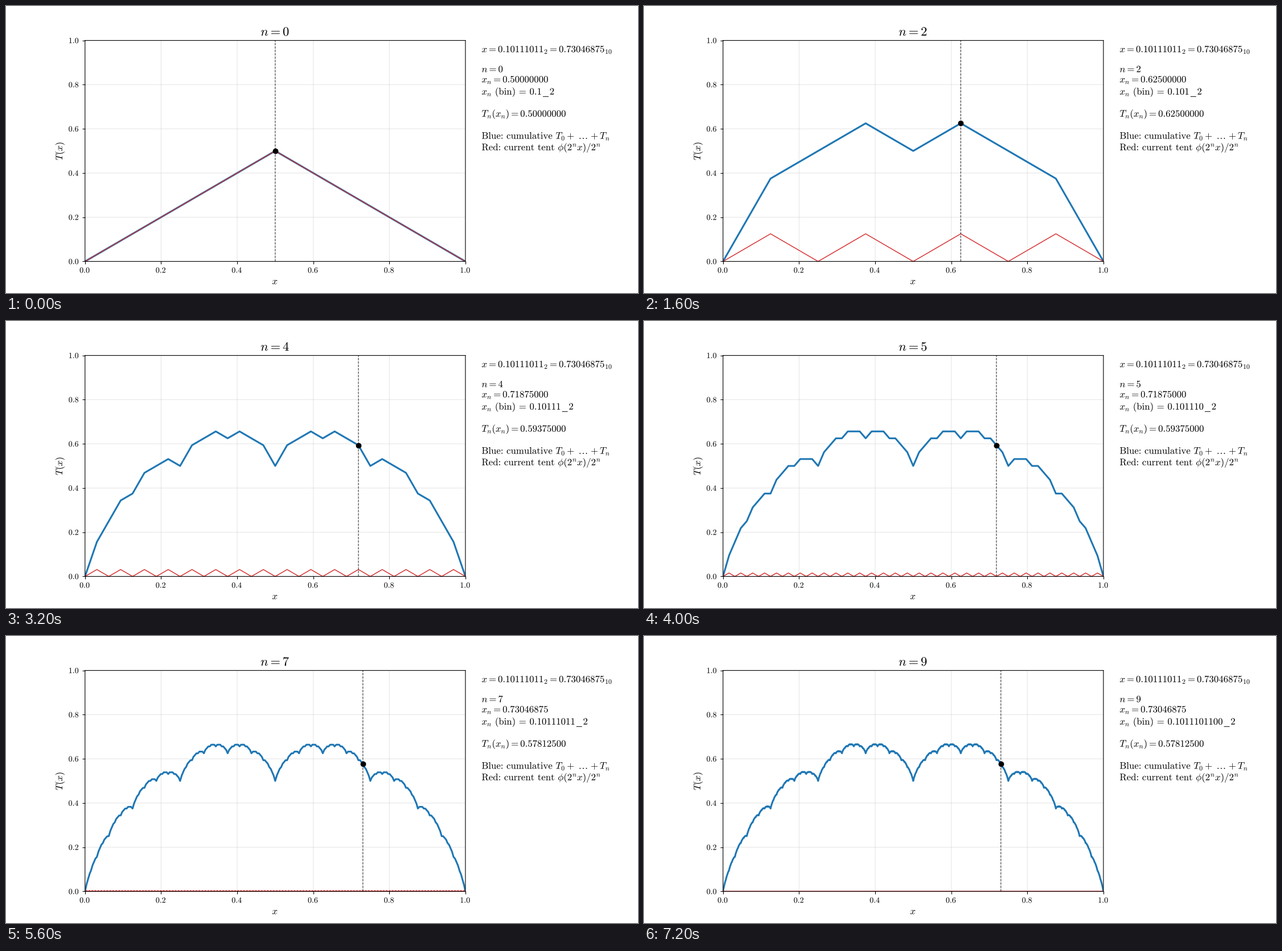
Animation, 1110 px wide and 505 px high, one loop 8 s. Source, as a matplotlib script:

```python
import matplotlib.pyplot as plt
import numpy as np
from matplotlib.animation import FuncAnimation
from matplotlib.lines import Line2D
from matplotlib.patheffects import Normal

WIDTH, HEIGHT = 1110, 505
DPI = WIDTH / 11
STEPS = 10
X = 0b10111011 / 2**8
INFO_X = 835.4
DIGIT = 8.39  # advance of one digit in the info column

# Soft sub-pixel placement of lines and text instead of snapping to pixels.
plt.rcParams["path.snap"] = False
plt.rcParams["mathtext.fontset"] = "cm"

fig, (ax, info) = plt.subplots(
    1, 2, figsize=(WIDTH / DPI, HEIGHT / DPI), dpi=DPI, facecolor="white",
    gridspec_kw={"width_ratios": [4, 1], "wspace": 0.06})
info.axis("off")
box = ax.get_position()
LEFT, RIGHT = box.x0 * WIDTH, box.x1 * WIDTH
TOP, BOTTOM = (1 - box.y1) * HEIGHT, (1 - box.y0) * HEIGHT


def put(x, y, text, size=12, **kw):
    """Place text as outlines with its baseline at stage pixel (x, y)."""
    kw.setdefault("va", "baseline")
    return fig.text(x / WIDTH, 1 - y / HEIGHT, text, fontsize=size,
                    path_effects=[Normal()], **kw)


def roman(*words):
    """Upright words joined by text spaces, for use in math mode."""
    return r"\hspace{0.38}".join(rf"\mathrm{{{w}}}" for w in words)


def tent(x, n):
    y = x * 2**n
    return np.abs(y - np.round(y)) / 2**n


def partial_sum(x, n):
    return sum(tent(x, k) for k in range(n + 1))


ticks = np.linspace(0, 1, 6)
ax.set(xlim=(0, 1), ylim=(0, 1))
ax.set_xticks(ticks, [""] * 6)
ax.set_yticks(ticks, [""] * 6)
ax.grid(True, alpha=0.3)
for t in ticks:
    label = f"${t:.1f}$"
    put(LEFT + t * (RIGHT - LEFT), 469.3, label, 10, ha="center")
    put(129, BOTTOM - t * (BOTTOM - TOP) + 4.7, label, 10, ha="right")

middle = (LEFT + RIGHT) / 2
put(middle, 489.5, "$x$", ha="center")
put(94.5, 255, "$T(x)$", ha="center", va="center", rotation=90)
title = put(middle, 52.2, "", 16, ha="center")

COLON = r"\hspace{-0.2}:\hspace{0.18}"
put(INFO_X, 81.3, "$x=0.10111011_2=0.73046875_{10}$")
n_text = put(INFO_X, 116.4, "")
x_text = put(INFO_X, 134.4, "")
bin_text = put(INFO_X, 155.8, "")
base_text = put(INFO_X, 155.8, "$2$")
value_text = put(INFO_X, 194.7, "")
put(INFO_X, 233.7, "$" + roman("Blue") + COLON + roman("cumulative")
    + r"\hspace{0.38}T_0+$")
put(1012.5, 233.7, r"$\dots$", ha="center")
put(1024, 233.7, r"$\hspace{0}+T_n$")
put(INFO_X, 253.8, "$" + roman("Red") + COLON + roman("current", "tent")
    + r"\hspace{0.38}\phi(2^n x)/2^n$")
underscore = Line2D([], [], color="black", lw=0.7, solid_capstyle="butt")
fig.add_artist(underscore)

grid = np.linspace(0, 1, 2049)
total_line, = ax.plot([], [], color="tab:blue", lw=2.2)
tent_line, = ax.plot([], [], color="tab:red", lw=1)
guide = ax.axvline(0.5, color="black", ls="--", lw=0.8, alpha=0.8)
point, = ax.plot([], [], "ko", ms=6)


def update(n):
    prefix = int(X * 2**(n + 1))
    xn = prefix / 2**(n + 1)
    value = partial_sum(xn, n)
    total_line.set_data(grid, partial_sum(grid, n))
    tent_line.set_data(grid, tent(grid, n))
    guide.set_xdata([xn, xn])
    point.set_data([xn], [value])

    title.set_text(f"$n={n}$")
    n_text.set_text(f"$n={n}$")
    x_text.set_text(f"$x_n={xn:.8f}$")
    bin_text.set_text(r"$x_n\hspace{0.38}\mathrm{(bin)}\hspace{0.18}=\hspace{0.18}"
                      f"0.{prefix:0{n + 1}b}$")
    value_text.set_text(f"$T_n(x_n)={value:.8f}$")
    shift = n * DIGIT
    underscore.set_data([(943 + shift) / WIDTH, (953 + shift) / WIDTH],
                        [1 - 159.3 / HEIGHT] * 2)
    base_text.set_x((954.7 + shift) / WIDTH)
    return ()


animation = FuncAnimation(fig, update, frames=STEPS, interval=800,
                          repeat=True, repeat_delay=0, blit=False)
plt.show()
```
